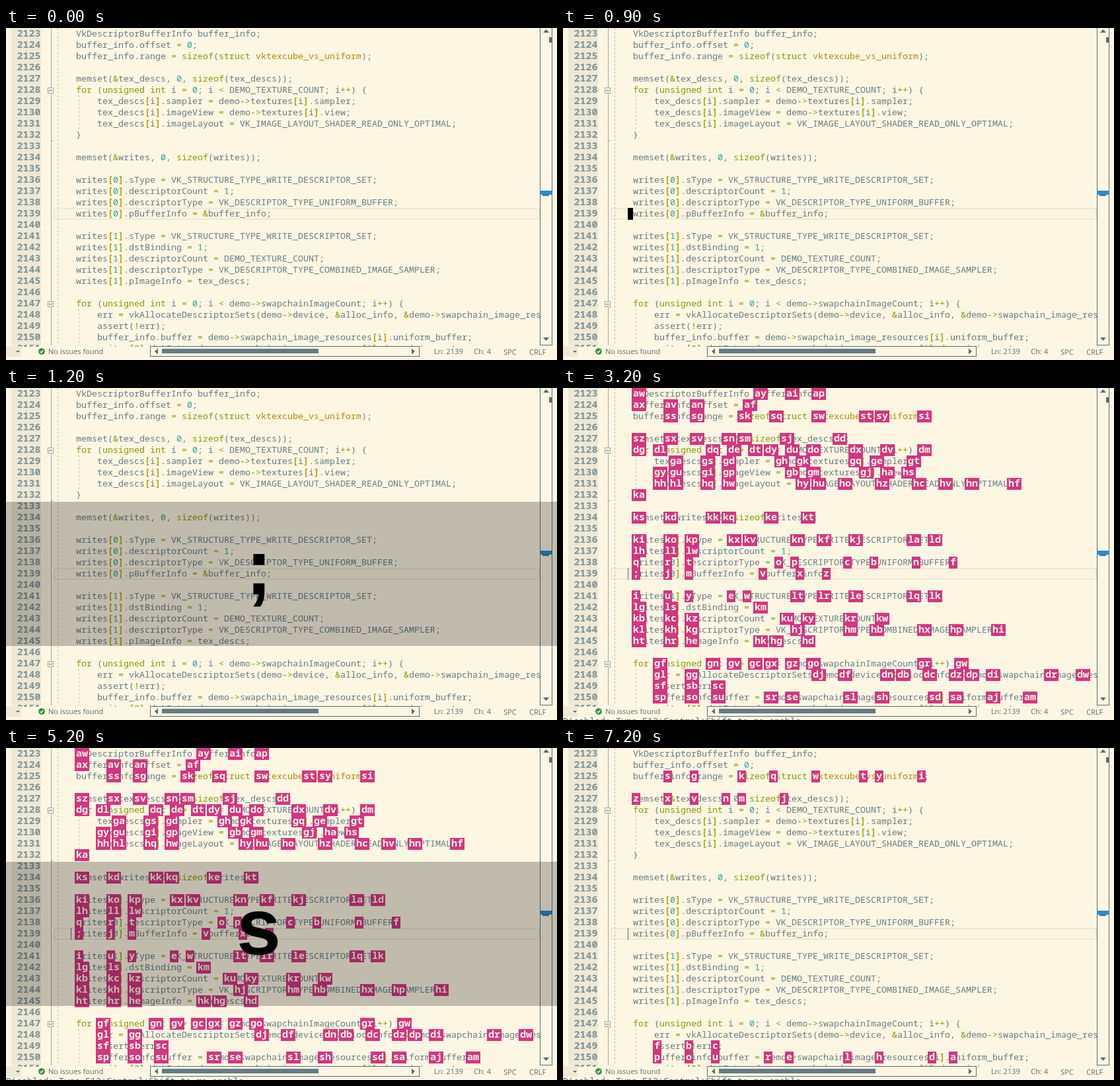
An HTML page with a canvas that plays this animation: 834x502 px, repeating every 8 s.

```html
<!DOCTYPE html>
<html lang="en">
<head>
<meta charset="utf-8">
<title>Code editor jump labels</title>
<style>
html, body { margin: 0; width: 834px; height: 502px; overflow: hidden; background: #fdf6e3; }
canvas { display: block; }
</style>
</head>
<body>
<canvas id="stage" width="834" height="502"></canvas>
<script>
const ctx = document.getElementById('stage').getContext('2d');
const W = 834, H = 502, LOOP = 8000;
const LINE = 17, CELL = 18, CHAR = 8, LEFT = 106, FIRST = 2123;
const CARET_X = 98, CARET_Y = 16 * LINE;
const BOTTOM = 480, RIGHT = 808;
const MONO = '"Noto Sans Mono", "DejaVu Sans Mono", monospace';
const CODE_FONT = '13.333px ' + MONO;
const BRACKET_FONT = 'bold ' + CODE_FONT;
const BOLD_FONT = 'bold 15px ' + MONO;
const UI_FONT = '11.1px "Open Sans", "Noto Sans", sans-serif';
const KEY_FONT = 'bold 120px "Liberation Sans", Arial, sans-serif';
const C = {
  paper: '#fdf6e3', gutter: '#eee8d5', text: '#657b83', dark: '#586e75', num: '#7a9296',
  keyword: '#859900', number: '#2aa198', bracket: '#b5a000', type: '#b58900', line: '#fcf4e0',
  label: '#d33682', mark: '#268bd2', guide: '#bdbdb5', fold: '#a3a59f', ok: '#2f9135'
};

// Code and its labels; each ` marks where the next label lands.
const source = [
  ['`VkDescriptorBufferInfo `buffer`_info`;', 'aw ay ai ap'],
  ['`buffer`_info`.offset = `0;', 'ax av an af'],
  ['buffer`_info`.range = `sizeof`(struct `vktexcube`_vs`_uniform`);', 'ss sg sk sq sw st sy si'],
  [''],
  ['`memset`(&tex`_descs`, 0`, sizeof`(tex_descs`));', 'sz sx sv sn sm sj dd'],
  ['`for `(unsigned `int `i = `0; `i < `DEMO`_TEXTURE`_COUNT`; i++) `{', 'dg dl dq de dt dy du do dx dv dm'],
  ['    tex`_descs`[i].`sampler = `demo`->textures`[i].`sampler`;', 'ga gs gd gh gk gq ge gt'],
  ['    `tex`_descs`[i].`imageView = `demo`->textures`[i].`view`;', 'gy gu gi gp gb gm gj ha hs'],
  ['    `tex`_descs`[i].`imageLayout = `VK_`IMAGE`_LAYOUT`_SHADER`_READ`_ONLY`_OPTIMAL`;',
    'hh hl hq hw hy hu ho hz hc hv hn hf'],
  ['`}', 'ka'],
  [''],
  ['`memset`(&writes`, 0`, sizeof`(writes`));', 'ks kd kk kq ke kt'],
  [''],
  ['`writes`[0].`sType = `VK_`STRUCTURE`_TYPE`_WRITE`_DESCRIPTOR`_SET`;', 'ki ko kp kx kv kn kf kj la ld'],
  ['`writes`[0].`descriptorCount = 1;', 'lh ll lw'],
  ['`writes`[0].`descriptorType = `VK_`DESCRIPTOR`_TYPE`_UNIFORM`_BUFFER`;', 'q r t o p c b n f'],
  ['`writes`[0].`pBufferInfo = `&buffer`_info`;', '; j m v x z'],
  [''],
  ['`writes`[1].`sType = `VK_`STRUCTURE`_TYPE`_WRITE`_DESCRIPTOR`_SET`;', 'i u y e w lt lr le lq lk'],
  ['`writes`[1].dstBinding = `1;', 'lg ls km'],
  ['`writes`[1].`descriptorCount = `DEMO`_TEXTURE`_COUNT`;', 'kb kc kz ku ky kr kw'],
  ['`writes`[1].`descriptorType = VK_`DESCRIPTOR`_TYPE`_COMBINED`_IMAGE`_SAMPLER`;',
    'kl kh kg hj hm hb hx hp hi'],
  ['`writes`[1].`pImageInfo = `tex`_descs`;', 'ht hr he hk hg hd'],
  [''],
  ['for `(unsigned `int `i = `0; `i < `demo`->swapchainImageCount`; i++) `{', 'gf gn gv gc gx gz go gr gw'],
  ['    `err = `vkAllocateDescriptorSets`(demo`->device`, &`alloc`_info`, &`demo`->swapchain`_image`_resources[i]',
    'gl gg dj df dn db dc dz dp di dr dw'],
  ['    `assert`(!err`);', 'sf sb sc'],
  ['    `buffer`_info`.buffer = `demo`->swapchain`_image`_resources`[i].`uniform`_buffer`;',
    'sp so su sr se sl sh sd sa aj am'],
  ['    writes[0].dstSet = demo->swapchain_image_resources[i].descriptor_set;']
];

const lines = source.map(([marked, names = '']) => {
  const parts = marked.split('`'), labels = [];
  let col = 0;
  names.split(' ').forEach((name, i) => {
    col += parts[i].length;
    if (name) labels.push({ name, col });
  });
  return { code: parts.join(''), labels };
});

const TOKEN = /\w+|[\[\]]|[=<>+&!-]+|[^\s]/g;
function tokenColor(t) {
  if (/^(for|unsigned|int|sizeof|struct)$/.test(t)) return C.keyword;
  if (/^\d/.test(t)) return C.number;
  if (t === 'vktexcube_vs_uniform') return C.type;
  if (/^[\[\]]$/.test(t)) return C.bracket;
  return /^[=<>+&!-]/.test(t) ? C.keyword : C.text;
}

function rect(x, y, w, h, color) {
  ctx.fillStyle = color;
  ctx.fillRect(x, y, w, h);
}
function box(x, y, w, h, color, line = 1) {
  ctx.strokeStyle = color;
  ctx.lineWidth = line;
  ctx.strokeRect(x + line / 2, y + line / 2, w - line, h - line);
}
function text(s, x, y, font, color) {
  ctx.font = font;
  ctx.fillStyle = color;
  ctx.fillText(s, x, y);
}
function poly(color, ...pts) {
  ctx.fillStyle = color;
  ctx.beginPath();
  pts.forEach(([x, y]) => ctx.lineTo(x, y));
  ctx.fill();
}
function dotted(x, y0, y1) {
  ctx.strokeStyle = C.guide;
  ctx.lineWidth = 1;
  ctx.setLineDash([3, 3]);
  ctx.beginPath();
  ctx.moveTo(x + .5, y0);
  ctx.lineTo(x + .5, y1);
  ctx.stroke();
  ctx.setLineDash([]);
}
function clipTo(w, h, draw) {
  ctx.save();
  ctx.beginPath();
  ctx.rect(0, 0, w, h);
  ctx.clip();
  draw();
  ctx.restore();
}

function drawFolds() {
  rect(68, 0, 1, BOTTOM, C.fold);
  rect(68, 170, 4, 1, C.fold);
  for (const row of [5, 24]) {
    const y = row * LINE + 5;
    rect(63, y, 9, 9, C.paper);
    box(63, y, 9, 9, C.fold);
    rect(65, y + 4, 5, 1, C.dark);
  }
  dotted(78, 0, BOTTOM);
  dotted(110, 102, 153);
  dotted(110, 425, BOTTOM);
}

function drawCode() {
  rect(8, 0, 45, BOTTOM, C.gutter);
  rect(72, CARET_Y, RIGHT - 72, CELL, C.line);
  box(72, CARET_Y, RIGHT - 72, CELL, C.gutter, 2);
  drawFolds();
  lines.forEach(({ code }, row) => {
    const y = row * LINE + 13;
    text(FIRST + row, 16.5, y, BOLD_FONT, C.num);
    for (const m of code.matchAll(TOKEN)) {
      const color = tokenColor(m[0]);
      const font = color === C.bracket ? BRACKET_FONT : CODE_FONT;
      text(m[0], LEFT + m.index * CHAR, y, font, color);
    }
  });
}

function drawLabels(prefix) {
  lines.forEach(({ labels }, row) => labels.forEach(({ name, col }) => {
    if (prefix && (name.length < 2 || name[0] !== prefix)) return;
    const s = name.slice(prefix.length), x = LEFT + col * CHAR;
    rect(x - 2, row * LINE, s.length * 9 + 4, CELL, C.label);
    text(s, x, row * LINE + 13, BOLD_FONT, C.paper);
  }));
}

function drawVerticalBar() {
  box(RIGHT, -1, 19, BOTTOM + 1, C.dark);
  poly(C.dark, [813, 7], [822, 7], [817.5, 2]);
  poly(C.dark, [813, 468], [822, 468], [817.5, 473]);
  rect(822, 14, 4, 8, C.dark);
  rect(812, 246, 10, 8, C.dark);
  rect(RIGHT, 246, 19, 6, C.mark);
}

function drawStatus(disabled) {
  rect(0, 481, 23, 16, C.gutter);
  poly(C.dark, [15, 488], [21, 488], [18, 491]);
  ctx.fillStyle = C.ok;
  ctx.beginPath();
  ctx.arc(54, 489, 4.8, 0, 7);
  ctx.fill();
  ctx.strokeStyle = '#fff';
  ctx.lineWidth = 1.3;
  ctx.beginPath();
  ctx.moveTo(51.5, 489);
  ctx.lineTo(53.3, 491);
  ctx.lineTo(56.5, 487);
  ctx.stroke();
  const items = [['No issues found', 64, 493], ['Ln: 2139', 648, 493], ['Ch: 4', 708, 493],
    ['SPC', 753, 494], ['CRLF', 792, 494]];
  for (const [s, x, y] of items) text(s, x, y, UI_FONT, C.dark);
  rect(218, 481, 408, 16, C.paper);
  box(218, 481, 408, 16, C.dark);
  poly(C.dark, [230, 484.5], [230, 493.5], [225, 489]);
  poly(C.dark, [614, 484.5], [614, 493.5], [619, 489]);
  rect(236, 485, 237, 7, C.text);
  if (disabled) text('Disabled: Type F12+Control+Shift to re-enable', 0, 508, CODE_FONT, C.dark);
}

function drawKeys(keys) {
  rect(0, 172, W, 218, 'rgba(0,0,0,.24)');
  ctx.textAlign = 'center';
  text(keys, 382.7, 312, KEY_FONT, '#000');
  ctx.textAlign = 'left';
}

function draw(t) {
  const jumping = t >= 3200;
  const blockOn = t < 1200 ? Math.floor(t / 300) % 2 === 1 : t >= 2200 && !jumping;
  let keys = '';
  if (t >= 1200 && t < 2200) keys = ';';
  else if (t >= 2200 && !jumping) keys = ';;';
  else if (t >= 5200 && t < 7200) keys = 's';

  rect(0, 0, W, H, C.paper);
  clipTo(RIGHT, BOTTOM + 2, () => {
    drawCode();
    if (jumping) {
      rect(CARET_X, CARET_Y, 1, CELL, C.dark);
      drawLabels(t >= 7200 ? 's' : '');
    }
  });
  drawVerticalBar();
  drawStatus(jumping);
  if (keys) drawKeys(keys);
  if (blockOn) rect(CARET_X, CARET_Y, 8, CELL, '#000');
}

const start = performance.now();
function tick() {
  draw((performance.now() - start) % LOOP);
  requestAnimationFrame(tick);
}
tick();
</script>
</body>
</html>
```
